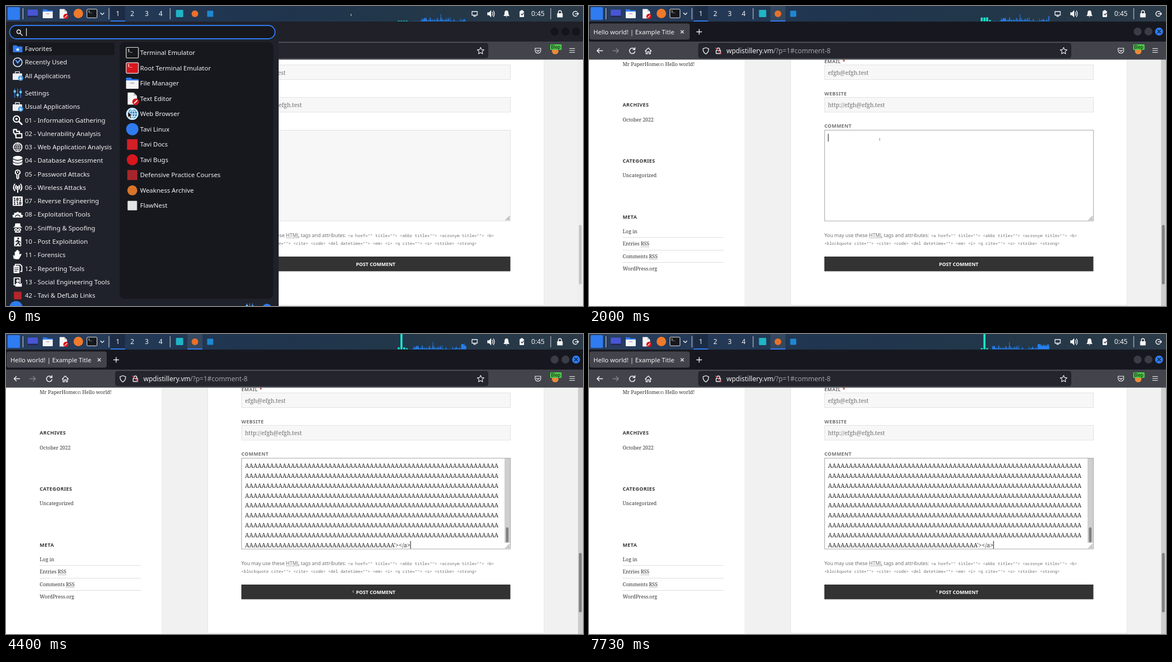
An HTML page that plays this animation: 1037x540 px, repeating every 8000 ms.

```html
<!DOCTYPE html>
<html lang="en">
<head>
<meta charset="utf-8">
<title>Desktop</title>
<style>
  html, body { margin: 0; width: 100%; height: 100%; overflow: hidden; background: #f1f1f1; }
  svg { display: block; width: 1037px; height: 540px; }
  text { white-space: pre; }
  .ui { font-family: "Noto Sans", "Open Sans", sans-serif; }
  .serif { font-family: "Noto Serif", serif; }
  .mono { font-family: "Noto Sans Mono", "DejaVu Sans Mono", monospace; }
  .head { font-family: "Noto Sans", sans-serif; font-weight: 700; letter-spacing: .04em; }
  .bold { font-family: "Noto Sans", sans-serif; font-weight: 700; }
</style>
</head>
<body>
<svg id="stage" viewBox="0 0 1037 540"></svg>
<script>
const LOOP = 8000, MENU_END = 1130, FOCUS = 1200, PASTE = 2470, BUSY = 2730;

// Markup helpers
const text = (x, y, s, size = 11.45, fill = '#f2f2f4', cls = 'ui', more = '') =>
  `<text x="${x}" y="${y}" font-size="${size}" fill="${fill}" class="${cls}" ${more}>` +
  s.replace(/&/g, '&amp;').replace(/</g, '&lt;') + '</text>';
const rect = (x, y, w, h, fill, rx = 0, more = '') =>
  `<rect x="${x}" y="${y}" width="${w}" height="${h}" fill="${fill}" rx="${rx}" ${more}/>`;
const disc = (x, y, r, fill, more = '') => `<circle cx="${x}" cy="${y}" r="${r}" fill="${fill}" ${more}/>`;
const line = (d, color = '#fff', w = 1.4, fill = 'none') =>
  `<path d="${d}" stroke="${color}" stroke-width="${w}" fill="${fill}" stroke-linecap="round" stroke-linejoin="round"/>`;
const shape = (d, fill = '#fff') => `<path d="${d}" fill="${fill}"/>`;
const at = (x, y, body, scale = 1) => `<g transform="translate(${x} ${y}) scale(${scale})">${body}</g>`;
const group = (id, body) => `<g id="${id}">${body}</g>`;
const border = color => `stroke="${color}" stroke-width="1"`;

// Icons, centred on 0,0
const folder = shape('M-9 -8h7l2 2h9v5h-18z', '#2f7bf0') + rect(-9, -4, 18, 12, '#f4f4f6', 1) + rect(-3, -1, 6, 1.6, '#bbb');
const page = shape('M-7 -9h9l5 5v13h-14z', '#f6f6f6') + shape('M2 -9l5 5h-5z', '#c8c8c8') +
  disc(5, 5, 5, '#d8161d') + line('M3 7l4 -4', '#fff', 1.4);
const term = bg => rect(-11, -9.5, 22, 19, bg, 1.5, 'stroke="#e8e8e8" stroke-width="1.2"') + text(-8.5, -1.5, '$_', 7, '#fff', 'mono');
const globe = (color, w = 1.2) => disc(0, 0, 7.3, 'none', `stroke="${color}" stroke-width="1.6"`) +
  line('M-7 0h14M0 -7v14M-6 -3.6h12M-6 3.6h12M0 -7q-7 7 0 14M0 -7q7 7 0 14', color, w);
const box = rect(-8.5, -4, 16, 11, '#f0f0f2', 1) + line('M-4 -4v-3h7v3', '#cfcfd4', 1.5) + disc(5, 4, 4.4, '#4aa3e8') + line('M5 2v4m-1.6 -1.6l1.6 1.6 1.6 -1.6', '#fff', 1);
const sliders = line('M-5 -7v14M0 -7v14M5 -7v14', '#3a6fc0', 1.6) + disc(-5, -3, 2.2, '#6cc5f0') + disc(0, 3, 2.2, '#6cc5f0') + disc(5, -2, 2.2, '#6cc5f0');
const magnifier = line('M-6 -1a4.5 4.5 0 1 1 9 0a4.5 4.5 0 1 1 -9 0M2 3l5 5', '#fff', 2.2);
const plainSquare = (size, fill) => rect(-size / 2, -size / 2, size, size, fill, 1);

const leftIcons = [
  shape('M-8 -6h6l2 2h8v10h-16z', '#2f7bf0') + shape('M0 -2l1 2.2h2.4l-1.9 1.6 .7 2.4 -2.2 -1.4 -2.2 1.4 .7 -2.4 -1.9 -1.6h2.4z'),
  disc(0, 0, 7.5, '#16233c', 'stroke="#e4e6ec" stroke-width="1.5"') + line('M-3 -3l3 4 4 -5', '#6aa5f5', 2),
  box, sliders, box,
  disc(-2, -2, 5.3, 'none', 'stroke="#fff" stroke-width="2"') + disc(-2, -2, 2, '#fff') + line('M2.5 2.5l4.5 4.5', '#fff', 2.6),
  line('M-7 -2v-5h5v3h5v3M-3 0h10v7h-10zM-6 -1l3 4', '#fff', 2),
  globe('#fff', .8),
  shape('M-8 -5a8 3.2 0 0 1 16 0v10a8 3.2 0 0 1 -16 0z') + line('M-8 -3q8 5 16 0M-8 2q8 5 16 0', '#20222b', 1.3),
  line('M-4 -3a4 4 0 1 1 8 0q0 2.5 -2.5 3.5v6l-1.5 1.5 -1.5 -1.5v-6q-2.5 -1 -2.5 -3.5M0 -4v1', '#fff', 1.9),
  line('M-5 -6q-4 6 0 11M5 -6q4 6 0 11M-2.5 -3.5q-2 3 0 6M2.5 -3.5q2 3 0 6M0 0v8', '#fff', 1.9) + disc(0, -1, 1.8, '#fff'),
  rect(-8.5, -8, 17, 16, '#fff', 1) + text(-7.6, -.6, '101', 8, '#16171d', 'mono', 'font-weight="700"') + text(-7.6, 6.8, '110', 8, '#16171d', 'mono', 'font-weight="700"'),
  shape('M-8 5l-1 -4 3 -1 0 -3 3 0 3 -2 3 2 3 0 0 3 3 1 -1 4z') + line('M-4 3q4 -5 8 0', '#20222b', 1.4),
  shape('M-8 -1h16l-3 -2 -1 -5h-8l-1 5z') + line('M-5 3a2 2 0 1 1 4 0a2 2 0 1 1 -4 0M1 3a2 2 0 1 1 4 0a2 2 0 1 1 -4 0M-4 7h8', '#fff', 1.8),
  rect(-6, -8, 12, 16, '#fff', 1) + disc(1, -5, 1.6, '#20222b') + line('M0 -2l-3 2M0 -2l1 4 3 4M1 2l-4 4M1 -1l3 2', '#20222b', 1.8),
  shape('M-5 0v-5q1 -2 2 0v-2q1 -2 2 0v-1q1 -2 2 0v2q1 -2 2 0v5l2 -1q2 0 1 2l-4 7h-6q-4 -3 -1 -7z') + line('M-7 1l1 5', '#fff', 1.6),
  line('M-4 -5v-2h8l3 3v9h-2', '#fff', 1.8) + rect(-7, -5, 10, 13, '#fff', 1) + line('M-5 -1h6M-5 2h6M-5 5h4', '#20222b', 1),
  line('M-6 -7h10v8M-6 -7v12h4', '#fff', 1.8) + disc(0, -2, 2.4, '#fff') + shape('M-4 8q0 -7 4 -7q2 0 3 2l4 -1v6z'),
  plainSquare(13, '#b3262b')
];
const leftNames = ['Favorites', 'Recently Used', 'All Applications', 'Settings', 'Usual Applications',
  '01 - Information Gathering', '02 - Vulnerability Analysis', '03 - Web Application Analysis',
  '04 - Database Assessment', '05 - Password Attacks', '06 - Wireless Attacks', '07 - Reverse Engineering',
  '08 - Exploitation Tools', '09 - Sniffing & Spoofing', '10 - Post Exploitation', '11 - Forensics',
  '12 - Reporting Tools', '13 - Social Engineering Tools', '42 - Tavi & DefLab Links'];

const rightItems = [
  ['Terminal Emulator', term('#16171b')],
  ['Root Terminal Emulator', term('#d8161d')],
  ['File Manager', at(0, 0, folder, 1.25)],
  ['Text Editor', at(0, 0, page, 1.2)],
  ['Web Browser', disc(0, 0, 11, '#2b86c5') + at(0, 0, globe('#dff2ff', .9), 1.35) + line('M-8 -4v11l2.6 -2.4 2 4 2 -1 -2 -4h3.4z', '#fff', 1, '#111')],
  ['Tavi Linux', disc(0, 0, 11, '#2f7bf0')],
  ['Tavi Docs', plainSquare(19, '#d31f26')],
  ['Tavi Bugs', disc(0, 0, 10, '#d8161d')],
  ['Defensive Practice Courses', plainSquare(18, '#a5262a')],
  ['Weakness Archive', disc(0, 0, 9, '#d8742a')],
  ['FlawNest', plainSquare(17, '#e4e4e4')]
];

const menu = rect(0, 28, 490, 512, '#20222b') +
  rect(6.5, 35, 477, 24, '#17181e', 12, 'stroke="#2f7bf0" stroke-width="1.8"') +
  at(24, 47, magnifier.replace(/#fff/, '#ddd'), .75) + rect(36, 40, 1.2, 14, '#f2f2f4') +
  rect(5, 65.5, 190, 23, '#17181e', 3) + rect(204.5, 65, 276, 462, '#17181e', 8) +
  leftNames.map((name, i) => {
    const y = i < 3 ? 77 + i * 24.3 : 157 + (i - 3) * 24.27;
    return at(21, y, leftIcons[i], 1.06) + text(34, y + 4, name);
  }).join('') +
  rightItems.map(([name, icon], i) => {
    const y = 84 + i * 27.53;
    return at(227, y, icon) + text(241, y + 4, name);
  }).join('') +
  disc(18, 543, 12, '#2f7bf0') + at(438, 543, sliders) + disc(469, 545, 9, '#2f7bf0');

// Web page
const dark = '#333', soft = '#707070';
const field = (y, value) => rect(423.5, y, 483, 26.5, '#f7f7f7', 0, border('#e2e2e2')) +
  text(429.5, y + 17.5, value, 10.4, soft, 'serif');
const label = (y, s) => text(423, y, s, 8.85, soft, 'head');
const side = (y, s, x = 60.5, fill = dark) => text(x, y, s, 8.9, fill, 'serif');
const sideHead = (y, s) => text(60.5, y, s, 9, dark, 'head');
const dotted = (x, y, w) => `<path d="M${x} ${y}h${w}" stroke="#777" stroke-dasharray="1 1"/>`;

const site = rect(0, 96, 1037, 444, '#f1f1f1') + rect(0, 96, 279.5, 444, '#fff') +
  rect(362.5, 90, 604.5, 448.5, '#fff', 0, border('#e6e6e6')) +
  side(107.5, 'Mr PaperHome') + side(107.5, 'on', 124, soft) + side(107.5, 'Hello world!', 137) +
  sideHead(181.3, 'ARCHIVES') + side(208, 'October 2022') +
  sideHead(282, 'CATEGORIES') + side(308.3, 'Uncategorized') +
  sideHead(382.7, 'META') + side(409, 'Log in') + side(431.3, 'Entries RSS') + side(453.8, 'Comments RSS') + side(476.3, 'WordPress.org') +
  [416.5, 439.5, 461.5].map(y => rect(60.5, y - .5, 181.5, 1, '#dedede')).join('') +
  dotted(93, 433.5, 15) + dotted(108, 456, 15) +
  label(102.7, 'EMAIL') + text(455.5, 102.7, '*', 8.85, '#c0392b', 'head') + field(106, 'efgh@efgh.test') +
  label(161, 'WEBSITE') + field(164.5, 'http://efgh@efgh.test') + label(219.3, 'COMMENT') +
  rect(423.5, 223.5, 483, 163.5, '#f7f7f7', 0, `id="area" stroke="#e2e2e2"`) +
  group('pasted',
    Array.from({ length: 9 }, (_, i) =>
      text(429.5, 241.2 + i * 17.8, i < 8 ? 'A'.repeat(61) : 'A'.repeat(36) + "'></a>", 10.6, dark, 'serif')).join('') +
    rect(896, 224, 10, 152, '#cfcfcf') + rect(898.5, 348, 4.6, 27, '#7f7f7f', 2.2)) +
  rect(429.5, 230, 1.1, 14, '#222', 0, 'id="caret"') +
  line('M898 385.5l7 -7M901 385.5l4 -4M903.6 385.5l1.4 -1.4', '#555', .9) +
  text(423, 416, 'You may use these HTML tags and attributes:', 8.9, soft) + dotted(504, 417.5, 24) +
  text(614.5, 416, '<a href="" title=""> <abbr title=""> <acronym title=""> <b>', 7.43, soft, 'mono') +
  text(423, 429.7, '<blockquote cite=""> <cite> <code> <del datetime=""> <em> <i> <q cite=""> <s> <strike> <strong>', 7.43, soft, 'mono') +
  rect(423, 451, 483.5, 26.5, dark) + text(629, 467.7, 'POST COMMENT', 8.8, '#fff', 'bold') +
  rect(1028, 96, 9, 444, '#eee', 0, 'id="rail"') + rect(1029.7, 394, 5, 107, '#c4c4c4', 2.5, 'id="thumb"');

// Browser frame
const ink = '#f4f4f6';
const frame = rect(0, 28, 1037, 36, '#1f2028', 0, 'id="title"') + rect(1, 31.5, 180, 29, '#42434b', 4) +
  text(8, 50.5, 'Hello world! | Example Title', 11.2, ink) + line('M165 44l5 5m0 -5l-5 5', ink, 1.1) +
  line('M198 42v9M193.5 46.5h9', ink, 1.3) +
  [986, 1005.5, 1024.5].map((x, i) => disc(x, 46, 7.2, '#14151b', `id="button${i}"`)).join('') +
  group('cross', line('M1022 43.5l5 5m0 -5l-5 5', '#111', 1.3)) +
  rect(0, 64, 1037, 32.5, '#42434b') +
  line('M24.5 80.5h-10m4 -4l-4 4 4 4', ink, 1.4) + line('M43 80.5h10m-4 -4l4 4 -4 4', '#85868d', 1.4) +
  line('M82 78a5 5 0 1 0 .6 4M82.6 75v3.6h-3.6', ink, 1.5) + line('M101 81l5.5 -5.5 5.5 5.5M102.5 80v6h2.6v-3.5h3v3.5h2.4v-6', ink, 1.3) +
  rect(197, 67.5, 669, 25.5, '#24252d', 3, border('#1b1c22')) +
  line('M210 75l5 1.8q.4 6.5 -5 9.7q-5.4 -3.2 -5 -9.7z', ink, 1.3) +
  line('M228.5 80h8v5.5h-8zM230 80v-2a2.5 2.5 0 0 1 5 0v2', ink, 1.3) + line('M227.5 75.5l10 10.5', '#e0415a', 1.4) +
  text(247, 84.7, 'wpdistillery.vm', 12, ink) + text(331, 84.7, '/?p=1#comment-8', 12, '#a2a3aa') +
  line('M853 74.5l1.8 3.9 4.2 .5 -3.1 2.9 .8 4.2 -3.7 -2.1 -3.7 2.1 .8 -4.2 -3.1 -2.9 4.2 -.5z', ink, 1.1) +
  line('M951 76h10v4a5 5 0 0 1 -10 0zM953.5 79.5l2.5 2.3 2.5 -2.3', ink, 1.2) +
  disc(987, 81, 6, '#e98b3a') + rect(978, 69, 20.5, 10, '#4ccb49', 1.5) + text(979.3, 77, 'Blep', 8.2, '#111') +
  line('M1013 76.5h9M1013 80h9M1013 83.5h9', ink, 1.2);

// Desktop panel
const divider = x => rect(x, 4, 1, 20, '#d5d9e0');
const panel = `<linearGradient id="sky"><stop stop-color="#293e5e"/><stop offset=".4" stop-color="#20354f"/>
  <stop offset=".7" stop-color="#223749"/><stop offset="1" stop-color="#2b3a47"/></linearGradient>` +
  rect(0, 0, 1037, 28, 'url(#sky)') + rect(3, 2, 22, 23, '#2f7bf0', 2) + divider(30) +
  rect(39, 6.5, 18, 14, '#4756d6', 1) + rect(39, 17.5, 18, 3, '#22264f') +
  at(75, 14, folder) + at(103, 14, page, .95) + disc(130, 13.5, 8.5, '#f07a2a') + at(154.5, 13.5, term('#17181c'), .82) +
  line('M170 12.5l3 3 3 -3', ink, 1.3) + divider(184.5) +
  rect(188, 0, 26, 28, '#1c2c44') + rect(188, 26, 26, 2, '#2f7bf0') +
  [201, 227, 253, 278].map((x, i) => text(x, 18.3, `${i + 1}`, 12, ink, 'ui', 'text-anchor="middle"')).join('') +
  divider(294.5) + group('task', rect(326, 0, 27, 28, '#34485f') + rect(326, 26, 27, 2, '#2f7bf0')) +
  rect(305.5, 7, 13, 13, '#1fb5c6', 1) + disc(339.5, 14, 6, '#e8702c') + rect(361.5, 8.5, 11, 11, '#1f86d0', 1) +
  `<path id="load" fill="#2480f0"/><path id="cores" fill="#16e8cf"/>` +
  line('M837.5 10h9.5v6.5h-9.5zM840.5 18.5h3.5', ink, 1.3) +
  shape('M865 11.5h3l4 -4v13l-4 -4h-3z', ink) + line('M874 11q2 3 0 6M876 8.7q3.6 5.3 0 10.6', ink, 1.3) +
  shape('M894 18q2 -2 2 -5q0 -5 3.5 -5t3.5 5q0 3 2 5zM898 19h3q-1.5 2 -3 0z', ink) +
  rect(923, 9, 8, 11, ink, 1) + rect(925, 7.5, 4, 2, ink) + line('M926 14.5l1.6 1.6 2.6 -3.4', '#223', 1.1) +
  text(944, 18.2, '0:45', 12.1, ink) + divider(978.5) +
  rect(990.5, 13, 10, 7.5, ink, 1) + line('M992.7 13v-2a2.8 2.8 0 0 1 5.6 0v2', ink, 1.5) +
  line('M1026 10.5a4.4 4.4 0 1 0 0 7M1023 14h6m-2 -2l2 2 -2 2', ink, 1.4);

document.getElementById('stage').innerHTML =
  site + frame + group('menu', menu) + panel + '<path id="pointer" fill="none" stroke-width="1"/>';
const el = id => document.getElementById(id);
const show = (id, on) => el(id).setAttribute('visibility', on ? 'visible' : 'hidden');
const fill = (id, color) => el(id).setAttribute('fill', color);

// Keys are [time, ...values], interpolated linearly
function track(keys, t) {
  const i = keys.findLastIndex(k => k[0] <= t), a = keys[i], b = keys[i + 1] || a;
  const u = b === a ? 0 : (t - a[0]) / (b[0] - a[0]);
  return a.slice(1).map((v, n) => v + (b[n + 1] - v) * u);
}
const pointerKeys = [[0, 620.5, 16], [130, 620.5, 16], [600, 511, 190], [930, 522.5, 240], [3200, 522.5, 240],
  [3600, 615.5, 469], [4000, 617.5, 467], [4470, 625.5, 463]];
const coreKeys = [[0, 1, 1, 1, 1], [1000, 4, 6, 5, 3], [2470, 8, 7, 8, 2], [3670, 4, 6, 4, 3], [5200, 2, 2, 2, 0]];

const noise = i => { const v = Math.sin(i * 91.7) * 4373.1; return v - Math.floor(v); };
function sample(i) {
  const n = noise(i);
  if (i === 0) return 13;
  if (i < -42) return n * .8;
  if (i < 22) return 1 + n ** 3 * 6;
  return i < 61 ? .5 + n ** 3 * 5 : 5 + n * 5;
}

function drawMeter(t) {
  const step = Math.floor((t + 40) / 250);
  let d = '';
  for (let i = step - 67; i <= step + 54; i++) {
    d += `M${(781 + (i - step) * .84).toFixed(2)} 27.5h.9v${-sample(i).toFixed(1)}h-.9z`;
  }
  el('load').setAttribute('d', d);
  const heights = track(coreKeys, step * 250);
  if (t >= BUSY) heights[1] = 27.5;
  el('cores').setAttribute('d', heights.map((h, i) => `M${704 + i * 4.9} 27.5h3.6v${-h}h-3.6z`).join(''));
}

function drawPointer(t) {
  const [x, y] = track(pointerKeys, Math.floor((t + 5) * .015) / .015);
  const light = y < 97 || (y > 451 && y < 478);
  const p = el('pointer');
  p.setAttribute('transform', `translate(${x} ${y})`);
  p.setAttribute('d', light ? 'M-.4 -2q-.6 2 .5 4' : 'M0 -1.8v1.3M0 .7v1.3');
  p.setAttribute('stroke', light ? '#ddd' : '#333');
}

function render(t) {
  const focus = t >= FOCUS, pasted = t >= PASTE;
  show('menu', t < MENU_END);
  show('task', t >= MENU_END);
  show('pasted', pasted);
  show('caret', focus);
  show('cross', focus);
  el('caret').setAttribute('x', pasted ? 726.5 : 429.5);
  el('caret').setAttribute('y', pasted ? 372.5 : 230);
  el('area').setAttribute('stroke', focus ? '#a8a8a8' : '#e2e2e2');
  fill('area', focus ? '#fff' : '#f7f7f7');
  fill('title', focus ? '#17181f' : '#1f2028');
  fill('button0', focus ? '#3a3c46' : '#14151b');
  fill('button1', focus ? '#3a3c46' : '#14151b');
  fill('button2', focus ? '#2f7bf0' : '#14151b');
  fill('rail', focus ? '#cdcdcd' : '#eee');
  fill('thumb', focus ? '#7f7f7f' : '#c4c4c4');
  drawMeter(t);
  drawPointer(t);
}

const start = performance.now();
(function tick() {
  render((performance.now() - start) % LOOP);
  requestAnimationFrame(tick);
})();
</script>
</body>
</html>
```
